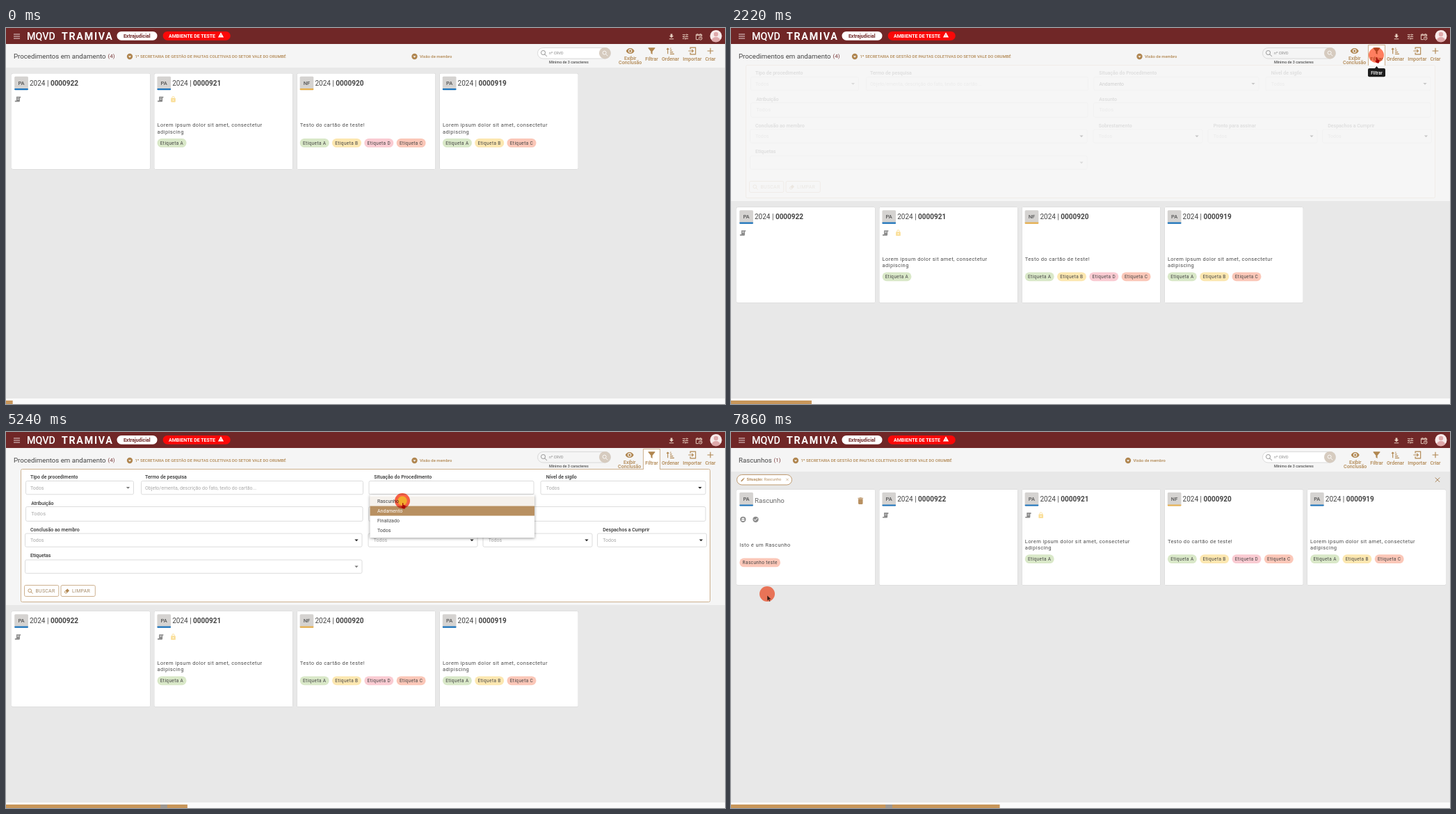
An HTML page that plays this animation: 1034x541 px, repeating every 8000 ms.

```html
<!DOCTYPE html>
<html lang="pt-BR">
<head>
<meta charset="utf-8">
<title>Procedimentos</title>
<style>
html, body { margin: 0; width: 100%; height: 100%; overflow: hidden; background: #e8e8e8; }
svg { display: block; font-family: Roboto, Arial, sans-serif; }
text { white-space: pre; }
.card { filter: drop-shadow(0 .8px .6px rgba(0, 0, 0, .36)); }
.menu { filter: drop-shadow(0 1px 2px rgba(0, 0, 0, .4)); }
#spot { mix-blend-mode: multiply; }
</style>
</head>
<body>
<svg id="stage" width="1034" height="541" viewBox="0 0 1034 541"></svg>
<script>
const TAN = '#b89061', BRONZE = '#b08650', EDGE = '#c8a983', WINE = '#702727', GREY = '#a9a9a9', INK = '#444';

const icons = {
  eye: 'M12 4.5C7 4.5 2.7 7.6 1 12c1.7 4.4 6 7.5 11 7.5s9.3-3.1 11-7.5c-1.7-4.4-6-7.5-11-7.5zM12 17a5 5 0 1 1 0-10 5 5 0 0 1 0 10zm0-8a3 3 0 1 0 0 6 3 3 0 0 0 0-6z',
  funnel: 'M3 3h18v2l-7 8.5V21l-4-2.5v-5L3 5z',
  download: 'M19 9h-4V3H9v6H5l7 7 7-7zM5 18v2h14v-2H5z',
  tune: 'M3 17v2h6v-2H3zM3 5v2h10V5H3zm10 16v-2h8v-2h-8v-2h-2v6h2zM7 9v2H3v2h4v2h2V9H7zm14 4v-2H11v2h10zm-6-4h2V7h4V5h-4V3h-2v6z',
  warning: 'M1 21h22L12 2 1 21zm12-3h-2v-2h2v2zm0-4h-2v-4h2v4z',
  trash: 'M6 19a2 2 0 0 0 2 2h8a2 2 0 0 0 2-2V7H6v12zM19 4h-3.5l-1-1h-5l-1 1H5v2h14V4z',
  lock: 'M18 8h-1V6A5 5 0 0 0 7 6v2H6a2 2 0 0 0-2 2v10a2 2 0 0 0 2 2h12a2 2 0 0 0 2-2V10a2 2 0 0 0-2-2zm-6 9a2 2 0 1 1 0-4 2 2 0 0 1 0 4zm3-9H9V6a3 3 0 0 1 6 0v2z',
  pencil: 'M3 17.2V21h3.8L17.8 9.9l-3.7-3.7zM20.7 7a1 1 0 0 0 0-1.4l-2.3-2.3a1 1 0 0 0-1.4 0l-1.9 1.8 3.8 3.8z',
  check: 'M12 2a10 10 0 1 0 0 20 10 10 0 0 0 0-20zm-2 15l-5-5 1.4-1.4 3.6 3.6 7.6-7.6L19 8z',
  drop: 'M12 2a10 10 0 1 0 0 20 10 10 0 0 0 0-20zm0 14l-5-6h10z',
  badge: 'M12 2a10 10 0 1 0 0 20 10 10 0 0 0 0-20zM7 9l5-3 5 3v2H7zM7 13h10v4H7z',
  scroll: 'M7 3h15v4h-3v11a3 3 0 0 1-3 3H2v-4h5zM10 7v1.5h6V7zm0 4v1.5h6V11z',
  eraser: 'M14 3l7 7-10 10H7l-5-5zM7 12l-2.5 3L8 18h2l2-2z'
};
const lineIcons = {
  menu: 'M3 6h18M3 12h18M3 18h18',
  search: 'M16 10a6 6 0 1 1-12 0 6 6 0 0 1 12 0zM14.5 14.5L21 21',
  sort: 'M5 20V5M2 8l3-3 3 3M11 5h3M11 10h5M11 15h8M11 20h11',
  enter: 'M7 8V3h14v18H7v-5M2 12h12M11 8l4 4-4 4',
  plus: 'M12 4v16M4 12h16',
  close: 'M5 5l14 14M19 5L5 19',
  calendar: 'M21 11V5H3v16h8M3 8h18M7 2v3M17 2v3M22 17a5 5 0 1 1-10 0 5 5 0 0 1 10 0zM17 14v3h2'
};

const text = (x, y, size, str, fill = INK, more = '') =>
  `<text x="${x}" y="${y}" font-size="${size}" fill="${fill}" ${more}>${str}</text>`;
const rect = (x, y, w, h, fill, more = '') =>
  `<rect x="${x}" y="${y}" width="${w}" height="${h}" fill="${fill}" ${more}/>`;
const icon = (name, cx, cy, size, color) => {
  const place = `transform="translate(${cx - size / 2} ${cy - size / 2}) scale(${size / 24})"`;
  return icons[name]
    ? `<path ${place} d="${icons[name]}" fill="${color}" fill-rule="evenodd"/>`
    : `<path ${place} d="${lineIcons[name]}" fill="none" stroke="${color}" stroke-width="2.1"/>`;
};
const group = (id, body) => `<g id="${id}">${body}</g>`;
const outline = color => `rx="2" stroke="${color}" stroke-width=".9"`;
const MID = 'text-anchor="middle" ', MEDIUM = 'font-weight="500"', BOLD = 'font-weight="700"';

// Top bar and toolbar
function topBar() {
  return rect(0, 0, 1034, 23, WINE) +
    icon('menu', 15.5, 12, 12, '#e6d6d6') +
    text(30, 16.5, 14.3, 'MQVD', '#fff', MEDIUM) +
    text(80, 16.5, 14.3, 'TRAMIVA', '#fff', BOLD + ' letter-spacing="1.7"') +
    rect(159.5, 5, 58, 12.7, '#fff', 'rx="6.3"') +
    text(188.3, 13.8, 7, 'Extrajudicial', WINE, MID + BOLD) +
    rect(225.7, 5, 97, 12.7, '#fb0808', 'rx="6.3"') +
    text(234, 13.9, 7, 'AMBIENTE DE TESTE', '#fff', BOLD) +
    icon('warning', 309, 10, 9, '#fff') +
    icon('download', 957, 12.5, 11, '#e6cfc0') +
    icon('tune', 977, 12.5, 11, '#e6cfc0') +
    icon('calendar', 996.5, 12.5, 11, '#e6cfc0') +
    `<circle cx="1021" cy="11.5" r="8.5" fill="#f8ebeb"/>
     <path d="M1015 18a6 5 0 0 1 12 0a8.5 8.5 0 0 1-12 0z" fill="#dfa9ab"/>
     <circle cx="1021" cy="9" r="3.2" fill="#dfa9ab"/>`;
}

const tool = (cx, name, lines) => icon(name, cx, 33, 13, BRONZE) +
  lines.map((s, i) => text(cx, (lines.length > 1 ? 45.6 : 46.6) + i * 6.7, 7, s, BRONZE, MID + MEDIUM)).join('');

function toolbar() {
  return group('titleAll', text(11, 44.4, 9.69, 'Procedimentos em andamento') + text(146.5, 43.4, 8, '(4)', '#7a3a3a')) +
    group('titleDraft', text(11, 44.4, 9.69, 'Rascunhos') + text(61.5, 43.4, 8, '(1)', '#7a3a3a')) +
    group('unit', icon('drop', 178, 41, 10, BRONZE) +
      text(185.5, 43.2, 5.9, '1ª SECRETARIA DE GESTÃO DE PAUTAS COLETIVAS DO SETOR VALE DO ORUMBÉ', BRONZE, MEDIUM)) +
    group('view', icon('drop', 587.5, 41, 10, BRONZE) + text(595, 43.2, 5.9, 'Visão de membro', BRONZE, MEDIUM)) +
    rect(764.5, 28.5, 105, 15.5, '#fff', 'id="search" rx="7.7" stroke="#d2d2d2" stroke-width=".8"') +
    icon('search', 773.5, 36.5, 12, '#a3a3a3') +
    text(781, 38.2, 5.4, 'nº CRVD', '#868686') +
    '<circle cx="861.3" cy="36.2" r="8.3" fill="#d6cbbf"/>' + icon('search', 861.5, 36.5, 10, '#fff') +
    text(781, 51.2, 5.38, 'Mínimo de 3 caracteres', '#555', MEDIUM) +
    group('show', tool(897.7, 'eye', ['Exibir', 'Conclusão'])) +
    `<path id="tab" d="M916.5 54V24.5H940.5V54" fill="#fff" stroke="${EDGE}" stroke-width=".9"/>` +
    tool(928.5, 'funnel', ['Filtrar']) + tool(955.5, 'sort', ['Ordenar']) +
    tool(986.8, 'enter', ['Importar']) + tool(1013, 'plus', ['Criar']);
}

// Cards
const slot = i => 8 + 205.2 * i;
const tagColor = { A: '#d9e8c8', B: '#fce7b0', C: '#fbc7b8', D: '#facbd2' };
const pill = (x, y, w, str, fill) => rect(x, y, w, 12.8, fill, 'rx="6.4"') +
  text(x + 4.3, y + 8.8, 6.46, str, INK, 'letter-spacing=".4"');
const body = (x, y, str) => text(x, y, 7.54, str, '#4c4c4c', 'letter-spacing=".4"');
const plate = (x, y, type) => rect(x, y, 199.2, 137.9, '#fff', 'rx="2" class="card"') +
  rect(x + 4.2, y + 4.5, 19.7, 19.5, '#d5d3d1', 'rx="1.5"') +
  rect(x + 4.2, y + 21.8, 19.7, 2.2, type === 'NF' ? '#e8b04c' : '#1b74bd', 'rx="1"') +
  text(x + 14, y + 16.3, 7.54, type, '#555', MID + MEDIUM);

function card(i, type, num, { scroll, lock, lines = [], tags = '' }) {
  const x = slot(i);
  return plate(x, 65.3, type) +
    text(x + 26, 82.7, 10, `2024 | <tspan font-weight="700">${num}</tspan>`) +
    (scroll ? icon('scroll', x + 9, 102.5, 10, '#8a8a8a') : '') +
    (lock ? icon('lock', x + 27.3, 102.5, 10, '#fadf9a') : '') +
    lines.map((s, n) => body(x + 4.3, 142.4 + n * 9.7, s)).join('') +
    [...tags].map((t, n) => pill(x + 4.3 + n * 46.3, 159, 42, 'Etiqueta ' + t, tagColor[t])).join('');
}

const lorem = ['Lorem ipsum dolor sit amet, consectetur', 'adipiscing'];
const cards = () => card(0, 'PA', '0000922', { scroll: true }) +
  card(1, 'PA', '0000921', { scroll: true, lock: true, lines: lorem, tags: 'A' }) +
  card(2, 'NF', '0000920', { lines: ['Testo do cartão de teste!'], tags: 'ABDC' }) +
  card(3, 'PA', '0000919', { lines: lorem, tags: 'ABC' });

const draft = () => rect(8.5, 61.5, 79, 14.5, '#fff', `rx="7.2" stroke="${TAN}" stroke-width=".9"`) +
  icon('pencil', 17, 68.5, 7, TAN) +
  text(22.5, 70.4, 5.6, '<tspan font-weight="700">Situação:</tspan> Rascunho', TAN) +
  icon('close', 81, 68.5, 6, TAN) + icon('close', 1016, 68.8, 11, '#a57c4c') +
  plate(8, 82.6, 'PA') + text(34, 102, 9.69, 'Rascunho', '#666') +
  icon('trash', 186.3, 99, 13, TAN) +
  icon('badge', 17.3, 125.8, 10, '#8a8a8a') + icon('check', 35.5, 125.8, 10, '#8a8a8a') +
  body(12.3, 164.8, 'Isto é um Rascunho') + pill(12.3, 181.5, 58.7, 'Rascunho teste', tagColor.C);

// Filter panel: [label, x, y, width, label inset, placeholder, arrow colour]
const fields = [
  ['Tipo de procedimento', 28.5, 71, 155, 6.5, 'Todos', '#777'],
  ['Termo de pesquisa', 194.5, 71, 319, 5.5, 'Objeto/ementa, descrição do fato, texto do cartão...'],
  ['Situação do Procedimento', 522, 71, 237, 7.3, ''],
  ['Nível de sigilo', 769, 71, 237, 7.8, 'Todos', '#222'],
  ['Atribuição', 28.5, 108, 484.5, 7.7, 'Todos'],
  ['Assunto', 521.5, 108, 484.5, 7.7, 'Todos'],
  ['Conclusão ao membro', 27.5, 146.5, 484.5, 7.5, 'Todos', '#222'],
  ['Sobrestamento', 521, 146.5, 157, 7.7, 'Todos', '#222'],
  ['Pronto para assinar', 686, 146.5, 157, 7.7, 'Todos', '#222'],
  ['Despachos a Cumprir', 850.5, 146.5, 157, 7.7, 'Todos', '#222'],
  ['Etiquetas', 27.5, 184.5, 484.5, 7.5, '', '#777']
];
const labelY = { 71: 67, 108: 104.6, 146.5: 142.5, 184.5: 180.2 };

function field([label, x, y, w, inset, hint]) {
  const tall = y === 108;
  return text(x + inset, labelY[y], 7, label, '#333', MEDIUM) +
    rect(x, y - .5, w, tall ? 20.8 : 19.3, '#fff', outline('#d9d9d9')) +
    text(x + inset, y + (tall ? 11.7 : 11.8), tall ? 7.54 : 7, hint, GREY);
}
const arrow = (x, y, color) => `<path d="M${x - 2.6} ${y - 1.2}h5.2l-2.6 2.8z" fill="${color}"/>`;
const arrows = () => fields.filter(f => f[6])
  .map(([, x, y, w, , , color]) => arrow(x + w - 8, y + 9.2, color)).join('');

const button = (id, x, name, str) => rect(x, 220.5, 49.3, 16, '#fff', `id="${id}" ${outline(EDGE)}`) +
  icon(name, x + 8.5, 229, 9.5, BRONZE) + text(x + 16, 231.3, 7, str, '#a58a68', 'letter-spacing=".25"');

const panel = () => rect(21.5, 53.5, 991, 191, '#fff', outline(EDGE)) +
  fields.map(field).join('') +
  button('seek', 26.5, 'search', 'BUSCAR') + button('clear', 79, 'eraser', 'LIMPAR');

const options = () => rect(523.5, 90.5, 236.5, 61.5, '#fff', 'class="menu"') +
  rect(523.5, 92.5, 236.5, 14, '#f5f1ec', 'id="hover"') +
  rect(523.5, 106.5, 236.5, 14, TAN) +
  ['Rascunho', 'Andamento', 'Finalizado', 'Todos'].map((s, i) =>
    text(534, 101.8 + 14 * i, 7, s, i === 1 ? '#fff' : INK)).join('');

const tip = (id, x, y, w, str, notch) => group(id, rect(x, y, w, 12.3, '#1d1d1d', 'rx="2"') +
  `<path d="M${x + w / 2 - 2.5} ${notch > 0 ? y + 12 : y}h5l-2.5 ${3 * notch}z" fill="#1d1d1d"/>` +
  text(x + w / 2, y + 8.5, 6.3, str, '#fff', MID + MEDIUM));

const pointers =
  `<path id="arrow" d="M0 1v8l2-1.7 1.3 2.9 1.3-.6L3.3 6.8H6z" fill="#333" stroke="#fff" stroke-width=".4"/>
   <path id="hand" d="M0 2.5q.7-.8 1.4 0V5l2.6.8q.8.3.5 1.500L3.800 10.500H.8L-1.700 7.500q0-1.100 1.700-.4z" fill="#a11"/>
   <path id="beam" d="M-3-3h2q1 0 1 1v7q0 1-1 1h-2M3-3H1q-1 0-1 1v7q0 1 1 1h2" fill="none" stroke="#b8453c" stroke-width="1.1"/>`;

document.getElementById('stage').innerHTML =
  `<radialGradient id="press"><stop offset=".52" stop-color="#fcb62f"/><stop offset=".68" stop-color="#ff6349"/></radialGradient>` +
  rect(0, 0, 1034, 541, '#e8e8e8') + rect(0, 23, 1034, 34, '#f5f5f5', 'id="band"') +
  group('cards', cards()) + group('draft', draft()) +
  topBar() + group('panel', panel()) +
  group('marks', arrows() + group('choice', arrow(751, 80.2, '#222') + text(529.5, 82.7, 6.9, 'Andamento', INK, 'id="value"'))) +
  toolbar() + group('options', options()) +
  tip('tipFilter', 916, 58, 25, 'Filtrar', -1) + tip('tipSeek', 35, 203.7, 33, 'BUSCAR', 1) +
  group('pointer', pointers) + '<circle id="spot" r="11"/>' +
  rect(0, 533, 1034, 8, '#fafafa') + rect(0, 536, 0, 5, '#c8965a', 'id="bar"') +
  rect(222.2, 536, 9.7, 5, '#9d9791', 'id="mark"');

const $ = Object.fromEntries([...document.querySelectorAll('[id]')].map(e => [e.id, e]));
const show = (e, on) => e.style.display = on ? '' : 'none';
const move = (e, x, y) => e.setAttribute('transform', `translate(${x} ${y})`);

// Pointer stops: [step, x, y]
const route = [[1, 969, 190], [6, 928, 39], [13, 928, 39], [18, 684, 80], [21, 684, 80],
  [24, 570, 99], [27, 570, 99], [30, 347, 152], [35, 52, 233], [40, 52, 233]];

function pointerAt(k) {
  const n = Math.max(1, route.findIndex(p => p[0] >= k));
  const [a, x0, y0] = route[n - 1], [b, x1, y1] = route[n];
  const u = Math.max(0, (k - a) / (b - a)), e = u * u * (3 - 2 * u);
  return [x0 + (x1 - x0) * e, y0 + (y1 - y0) * e];
}
const within = (k, ...spans) => spans.some(([a, b]) => k >= a && k <= b);

function draw(k) {
  const open = k >= 11 && k < 39, done = k >= 39, listed = within(k, [20, 26]);
  $.band.setAttribute('height', open ? 226 : 34);
  move($.cards, done ? 205.2 : 0, done ? 17.3 : open ? 192.4 : 0);
  show($.draft, done);
  show($.titleAll, !done);
  show($.titleDraft, done);
  move($.unit, done ? -85 : 0, 0);
  move($.view, done ? -16.5 : 0, 0);
  move($.show, open ? -1 : 0, 0);
  $.search.setAttribute('fill', open ? '#f5f5f5' : '#fff');

  for (const e of [$.panel, $.marks, $.tab]) show(e, open);
  $.panel.style.opacity = k === 11 ? .12 : 1;
  $.marks.style.opacity = k === 11 ? .22 : 1;
  show($.choice, !listed);
  $.value.textContent = k >= 27 ? 'Rascunho' : 'Andamento';
  show($.options, listed);
  show($.hover, k >= 24);
  $.seek.setAttribute('fill', within(k, [34, 38]) ? '#f5f0ea' : '#fff');
  show($.tipFilter, within(k, [7, 13]));
  show($.tipSeek, within(k, [36, 38]));

  const [x, y] = pointerAt(k), hand = within(k, [5, 13], [24, 27], [34, 38]), beam = within(k, [18, 22]);
  show($.pointer, k > 0);
  show($.spot, k > 0);
  show($.hand, hand);
  show($.beam, beam);
  show($.arrow, !hand && !beam);
  move($.spot, x, y);
  move($.pointer, k === 21 ? 632 : x, y + 1);
  $.spot.setAttribute('fill', within(k, [9, 10], [19, 19], [25, 26], [37, 38]) ? 'url(#press)' : '#ff7e5f');

  $.bar.setAttribute('width', 9.663 * (k + 1));
  show($.mark, k >= 23);
}

const start = performance.now();
function tick(now) {
  const t = Math.max(0, now - start) % 8000;
  draw(Math.min(39, Math.floor((t + 9) / 201.6)));
  requestAnimationFrame(tick);
}
draw(0);
requestAnimationFrame(tick);
</script>
</body>
</html>
```
